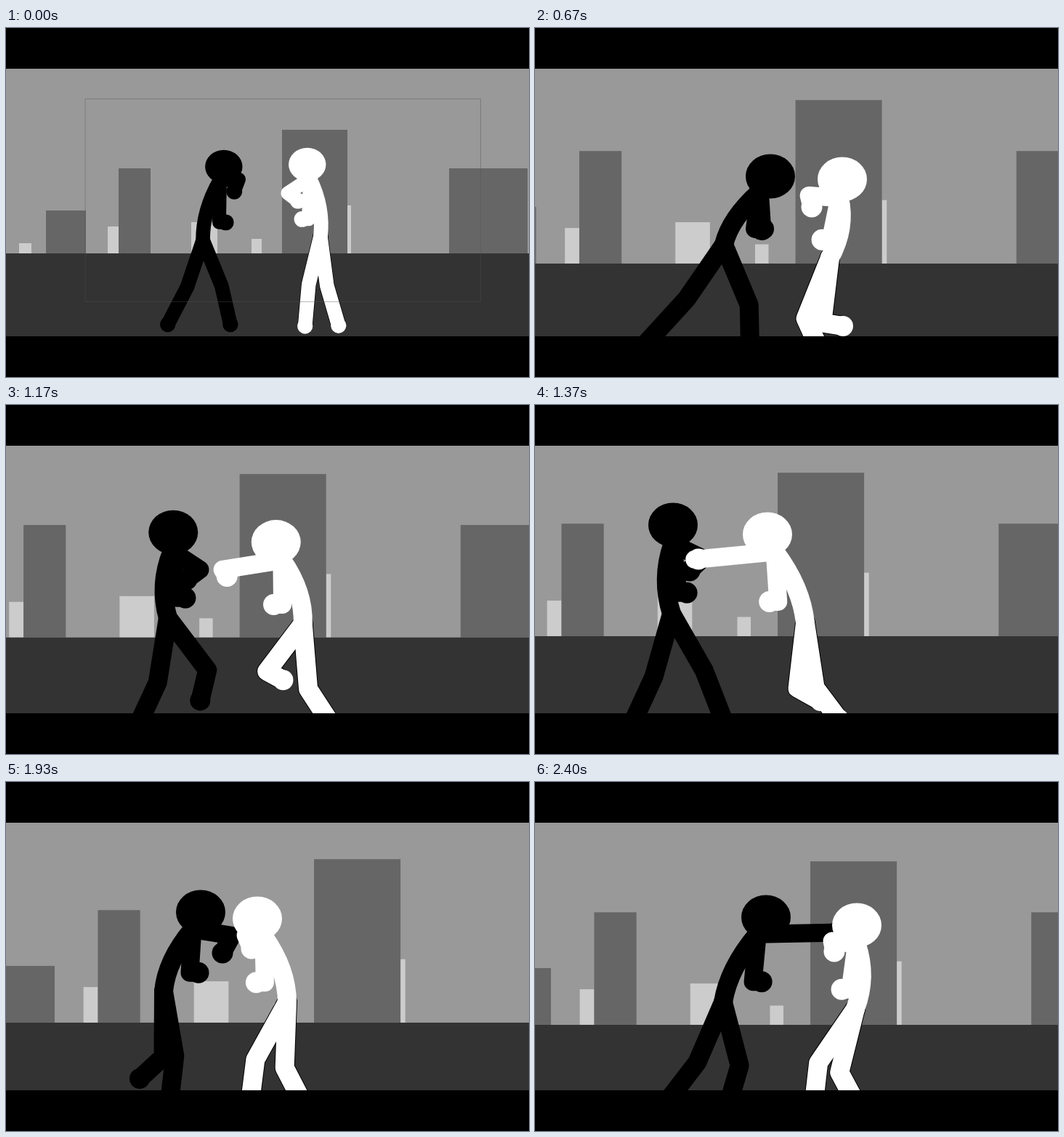
An HTML page with a canvas that plays this animation: 720 by 480 pixels, repeating every 2430 ms.

```html
<!DOCTYPE html>
<html lang="en">
<head>
<meta charset="utf-8">
<title>Stick fight</title>
<style>
  html, body { margin: 0; width: 100%; height: 100%; overflow: hidden; background: #000; }
  canvas { display: block; width: 720px; height: 480px; }
</style>
</head>
<body>
<canvas id="stage" width="720" height="480"></canvas>
<script>
const ctx = document.getElementById('stage').getContext('2d');
const LOOP = 2430, LAST = 72, ZOOM = 1.3225, HORIZON = 310;
const SKY = '#999', TOWER = '#666', GROUND = '#333', LAMP = '#ccc';
const INK = '#000', CHALK = '#fff';

// The opening picture shows the wide scene with the camera's outline.
const VIEW = { x: 110, y: 97, w: 544, h: 279 };

// Buildings: left, right, top
const TOWERS = [[55, 110, 251], [155, 199, 193], [380, 470, 140], [610, 718, 193]];
const LAMPS = [[18, 35, 296], [140, 155, 273], [255, 291, 267], [338, 352, 290], [470, 475, 244]];

const beats = [];
const beat = (step, camera, black, white) => beats.push({ step, camera, black, white });

// Camera offset, then for each fighter: head, hip, lead hand, two feet.
// Every other joint follows from these.
beat(0, [-145.5, -72.3],
  [251, 180, 213, 314, 270, 225, 149, 467, 263, 467],
  [403, 176, 427, 307, 386, 242, 399, 470, 460, 469]);
beat(9, [-137.5, -81],
  [197, 186, 187, 305, 236, 190, 150, 450, 260, 440],
  [356, 186, 405, 298, 260, 195, 405, 440, 432, 412]);
beat(20, [-144, -86],
  [324, 204, 260, 298, 311, 277, 147, 440, 296, 440],
  [423, 208, 406, 316, 381, 246, 391, 440, 424, 410]);
beat(28, [-196.5, -88],
  [281, 188, 267, 300, 294, 255, 243, 440, 274, 364],
  [437, 202, 455, 302, 404, 265, 367, 342, 480, 440]);
beat(41, [-168.5, -92],
  [190, 165, 188, 287, 213, 228, 133, 440, 262, 440],
  [320, 178, 372, 300, 225, 212, 393, 407, 418, 432]);
beat(58, [-78.5, -79],
  [268, 179, 217, 288, 298, 235, 225, 440, 184, 408],
  [346, 188, 387, 303, 338, 229, 336, 440, 408, 440]);
beat(LAST, [-123.5, -76],
  [318, 186, 259, 303, 415, 207, 183, 438, 267, 440],
  [443, 197, 441, 312, 412, 233, 384, 440, 441, 440]);

const clamp = (n, lo, hi) => Math.min(hi, Math.max(lo, n));
const mix = (a, b, u) => a.map((n, i) => n + (b[i] - n) * u);

function sample(step) {
  const i = Math.max(1, beats.findIndex(b => b.step >= step));
  const a = beats[i - 1], b = beats[i];
  const u = (step - a.step) / (b.step - a.step);
  const e = u * u * (3 - 2 * u);
  return name => mix(a[name], b[name], e);
}

// A joint between two points, swung off the straight line by turn(distance, angle).
function joint(from, to, facing, reach, turn) {
  const dx = (to[0] - from[0]) * facing, dy = to[1] - from[1];
  const d = Math.hypot(dx, dy), a = Math.atan2(dy, dx);
  const r = reach(d), b = a + turn(d, a);
  return [from[0] + Math.cos(b) * r * facing, from[1] + Math.sin(b) * r];
}

// Short legs bend their knees further forward.
const knee = (hip, foot, facing) => joint(hip, foot, facing,
  d => Math.min(90, d), d => -clamp((175 - d) * 0.0052, 0.07, 0.31));

// Arms straighten as they reach out.
const elbow = (neck, hand, facing) => joint(neck, hand, facing,
  d => d * 1.05, (d, a) => -Math.sin(2 * a) * clamp(1 - d / 100, 0, 1) * 1.1);

function limb(points, width) {
  ctx.lineWidth = width;
  ctx.beginPath();
  points.forEach(p => ctx.lineTo(...p));
  ctx.stroke();
}

function blob(p, rx, ry = rx) {
  ctx.beginPath();
  ctx.ellipse(...p, rx, ry, 0, 0, 7);
  ctx.fill();
}

function paint(color) {
  ctx.fillStyle = ctx.strokeStyle = color;
}

function fighter(pose, color, facing) {
  const [head, hip, hand, ...feet] = [0, 2, 4, 6, 8].map(i => pose.slice(i, i + 2));
  const neck = mix(head, hip, 26 / Math.hypot(hip[0] - head[0], hip[1] - head[1]));
  const lean = (neck[0] - hip[0]) * facing;
  const ahead = (p, d) => [p[0] + d * facing, p[1]];

  const legs = feet.map(f => [hip, knee(hip, f, facing), f]);
  if (color === CHALK) {
    paint(INK);
    legs.forEach(l => limb(l, 28));
  }
  paint(color);
  for (const l of legs) {
    limb(l, 26);
    blob(l[2], 14);
  }

  // The spine bows backwards.
  ctx.beginPath();
  ctx.moveTo(...neck);
  ctx.quadraticCurveTo(...ahead(mix(neck, hip, 0.5), -16), ...hip);
  ctx.stroke();

  // The rear hand hangs in guard, further out when leaning in.
  const guard = ahead(mix(neck, hip, 0.7), 20 + lean * 0.4);
  limb([neck, elbow(neck, hand, facing), hand], 25);
  limb([neck, ahead(guard, -12), guard], 25);
  blob(hand, 14.5);
  blob(guard, 14.5);
  blob(head, 34, 30.5);
}

function blocks(list, color) {
  ctx.fillStyle = color;
  for (const [l, r, top] of list) ctx.fillRect(l, top, r - l, HORIZON - top);
}

function scene() {
  blocks(LAMPS, LAMP);
  blocks(TOWERS, TOWER);
  ctx.fillStyle = GROUND;
  ctx.fillRect(-400, HORIZON, 1600, 400);
}

function draw(step) {
  const at = sample(step);
  const [cx, cy] = at('camera');
  const wide = step === 0;
  ctx.resetTransform();
  ctx.fillStyle = SKY;
  ctx.fillRect(0, 0, 720, 480);

  // Fighters live in close-up coordinates; the wide view undoes the camera.
  if (wide) {
    scene();
    ctx.setTransform(1 / ZOOM, 0, 0, 1 / ZOOM, -cx / ZOOM, -cy / ZOOM);
  } else {
    ctx.setTransform(ZOOM, 0, 0, ZOOM, cx, cy);
    scene();
    ctx.resetTransform();
  }
  ctx.lineCap = ctx.lineJoin = 'round';
  fighter(at('black'), INK, 1);
  fighter(at('white'), CHALK, -1);

  ctx.resetTransform();
  if (wide) {
    ctx.lineWidth = 1;
    ctx.strokeStyle = 'rgba(80,80,80,.4)';
    ctx.strokeRect(VIEW.x - 0.5, VIEW.y + 0.5, VIEW.w, VIEW.h);
  }
  ctx.fillStyle = INK;
  ctx.fillRect(0, 0, 720, 56);
  ctx.fillRect(0, 424, 720, 56);
}

// Thirty pictures a second, timed to hundredths.
function tick() {
  const t = performance.now() % LOOP;
  draw(Math.min(LAST, Math.floor((Math.floor(t / 10) + 0.5) * 0.3)));
  requestAnimationFrame(tick);
}
tick();
</script>
</body>
</html>
```
